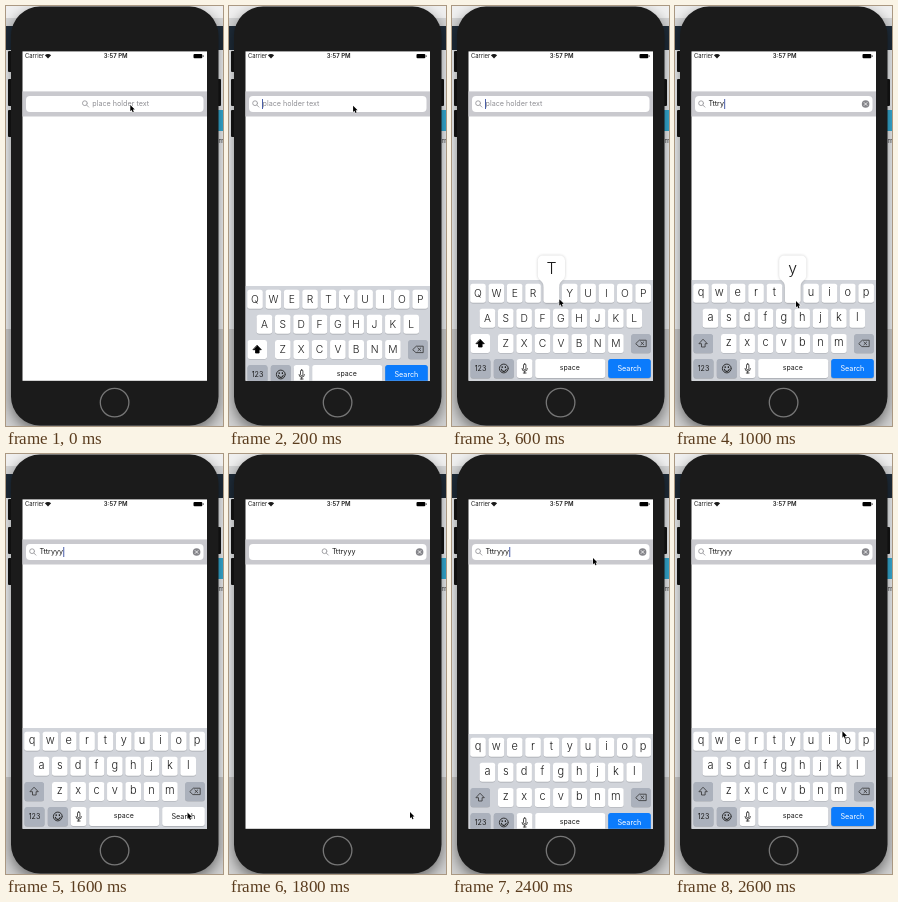
Animation, 217 px wide and 420 px high, one loop 2.7 s. Source, as an HTML page with a canvas:

```html
<!DOCTYPE html>
<html lang="en">
<head>
<meta charset="utf-8">
<title>Search bar typing</title>
<style>
html, body { margin: 0; width: 100%; height: 100%; overflow: hidden; background: #e8e8e8; }
canvas { display: block; width: 217px; height: 420px; }
</style>
</head>
<body>
<canvas id="stage"></canvas>
<script>
const W = 217, H = 420, LOOP = 2700, STEP = 100;
const FONT = 'Inter, "Liberation Sans", sans-serif';
const FIELD_SIZE = 7.2, PLACEHOLDER = 'place holder text';
const KEY_H = 19, KEY_W = 15.6, PITCH = 18.35;
const INK = '#1a1a1a', SPECIAL = '#abb1bc';
const ROWS = [['QWERTYUIOP', 26], ['ASDFGHJKL', 35.4], ['ZXCVBNM', 53.8]];
const SCREEN = [16.5, 45.4, 184.5, 329.4];
const rowY = i => 287.2 + 25.1 * i;

// Each track is a list of [time, value]; the value holds until the next one.
const TYPED = [[0, ''], [700, 'T'], [800, 'Tt'], [900, 'Ttt'], [1000, 'Tttry'], [1100, 'Tttryy'], [1200, 'Tttryyy']];
const PRESSED = [[0, ''], [600, 'T'], [700, ''], [800, 'T'], [900, 'R'], [1000, 'Y'], [1200, ''], [1300, 'Search'], [1700, '']];
const KEYBOARD_DROP = [[0, 105], [200, 6], [300, 0], [1700, 60], [1800, 105], [2400, 6], [2500, 0]];
const CARET = [[0, false], [200, true], [1700, false], [2400, true], [2600, false]];
const POINTER = [
  [0, 124.3, 99], [300, 124, 100], [500, 108, 270], [600, 107.3, 293.3], [800, 103, 292],
  [900, 86, 292], [1000, 121, 295], [1100, 120.5, 295], [1200, 150, 326], [1300, 180, 357],
  [1600, 181.5, 358.5], [1800, 181, 358], [1900, 170, 325], [2000, 151, 190],
  [2100, 140.7, 103.5], [2400, 141, 104], [2500, 156, 200], [2600, 167.4, 277.3]
];

const canvas = document.getElementById('stage');
const ratio = window.devicePixelRatio || 1;
canvas.width = W * ratio;
canvas.height = H * ratio;
const ctx = canvas.getContext('2d');
ctx.lineCap = ctx.lineJoin = 'round';

const hold = (track, t) => track.filter(k => k[0] <= t).pop()[1];

function pointerAt(t) {
  const next = POINTER.findIndex(p => p[0] > t);
  if (next < 0) return POINTER[POINTER.length - 1].slice(1);
  const a = POINTER[next - 1], b = POINTER[next], k = (t - a[0]) / (b[0] - a[0]);
  return [a[1] + (b[1] - a[1]) * k, a[2] + (b[2] - a[2]) * k];
}

function rect(x, y, w, h, color) {
  ctx.fillStyle = color;
  ctx.fillRect(x, y, w, h);
}

function round(x, y, w, h, r, color) {
  ctx.beginPath();
  ctx.roundRect(x, y, w, h, r);
  ctx.fillStyle = color;
  ctx.fill();
}

function text(s, x, y, size, color = INK, align = 'center', weight = 400) {
  ctx.font = `${weight} ${size}px ${FONT}`;
  ctx.textAlign = align;
  ctx.textBaseline = 'alphabetic';
  ctx.fillStyle = color;
  ctx.fillText(s, x, y);
}

function stroke(color, width, path) {
  ctx.beginPath();
  path();
  ctx.strokeStyle = color;
  ctx.lineWidth = width;
  ctx.stroke();
}

function polygon(points) {
  points.forEach(([x, y], i) => i ? ctx.lineTo(x, y) : ctx.moveTo(x, y));
  ctx.closePath();
}

function cross(x, y, r, color, width) {
  stroke(color, width, () => {
    ctx.moveTo(x - r, y - r); ctx.lineTo(x + r, y + r);
    ctx.moveTo(x + r, y - r); ctx.lineTo(x - r, y + r);
  });
}

function withShadow(alpha, blur, offsetY, paint) {
  ctx.save();
  ctx.shadowColor = `rgba(0,0,0,${alpha})`;
  ctx.shadowBlur = blur * ratio;
  ctx.shadowOffsetY = offsetY * ratio;
  paint();
  ctx.restore();
}

function drawBackdrop() {
  rect(0, 0, W, 12, '#f0f0f0');
  rect(0, 12, W, 8, '#d4d5d6');
  rect(0, 20, W, 24, '#1f2c39');
  rect(0, 44, W, 279, '#f4f6f8');
  rect(0, 323, W, 97, '#d2d2d2');
  rect(210, 104, 7, 21, '#37b2dc');
  text('m', 212.5, 137, 6, '#444', 'left');
}

function drawPhone() {
  [[45, 21], [73, 27], [104, 27]].forEach(([y, h]) => round(2, y, 5, h, 1, '#151515'));
  round(210, 73, 5, 27, 1, '#151515');
  withShadow(0.5, 14, 5, () => round(5, 0.5, 207.5, 419, 29, '#1b1b1b'));
  stroke('#777', 1.3, () => ctx.arc(108.6, 396.6, 14.3, 0, 7));
  rect(...SCREEN, '#fff');
}

function drawStatusBar() {
  text('Carrier', 19, 52.3, 5.9, INK, 'left');
  ctx.beginPath();
  ctx.moveTo(42, 52.4);
  ctx.arc(42, 52.4, 4.4, -2.36, -0.78);
  ctx.fillStyle = INK;
  ctx.fill();
  text('3:57 PM', 109.7, 52.3, 6, INK, 'center', 600);
  round(187.5, 48, 8.8, 4.2, 1, '#000');
  rect(196.8, 49.3, 0.7, 1.6, '#000');
}

function drawSearchBar(typed, editing, caret) {
  rect(16.5, 85.4, 184.5, 25.1, '#c9c9ce');
  round(20, 90, 177.5, 16, 4, '#fff');
  const label = typed || PLACEHOLDER;
  ctx.font = `400 ${FIELD_SIZE}px ${FONT}`;
  const width = ctx.measureText(label).width;
  const left = editing ? 33.5 : 114.7 - width / 2;
  const iconX = left - 7.6;
  stroke('#8e8e93', 0.8, () => {
    ctx.arc(iconX + 0.2, 97.2, 2.4, 0, 7);
    ctx.moveTo(iconX + 2, 99.1);
    ctx.lineTo(iconX + 4, 101.1);
  });
  text(label, left, 100, FIELD_SIZE, typed ? INK : '#8e8e93', 'left');
  if (caret) rect(left + (typed ? width + 0.2 : -0.5), 93, 1, 10, '#4a5fa8');
  if (typed) {
    ctx.beginPath();
    ctx.arc(190.6, 98, 3.8, 0, 7);
    ctx.fillStyle = '#85858a';
    ctx.fill();
    cross(190.6, 98, 1.4, '#fff', 0.8);
  }
}

function key(x, row, w, color = '#fff') {
  const y = rowY(row) - KEY_H / 2;
  round(x, y + 0.7, w, KEY_H, 2.5, '#a6a9af');
  round(x, y, w, KEY_H, 2.5, color);
}

function drawShift(upper) {
  key(18.5, 2, 19.5, upper ? '#fff' : SPECIAL);
  const y = rowY(2);
  ctx.beginPath();
  polygon([[28.3, y - 3.9], [32.3, y + 0.3], [30.1, y + 0.3], [30.1, y + 3.6], [26.5, y + 3.6], [26.5, y + 0.3], [24.3, y + 0.3]]);
  ctx.strokeStyle = ctx.fillStyle = upper ? '#000' : '#333';
  ctx.lineWidth = 0.8;
  if (upper) ctx.fill();
  ctx.stroke();
}

function drawDelete() {
  key(179.2, 2, 19.5, SPECIAL);
  const y = rowY(2);
  stroke('#333', 0.8, () => polygon([[184, y], [187.3, y - 3.2], [194.2, y - 3.2], [194.2, y + 3.2], [187.3, y + 3.2]]));
  cross(190.3, y, 1.4, '#333', 0.8);
}

function drawBottomRow(searching) {
  const y = rowY(3);
  key(18.5, 3, 20, SPECIAL);
  text('123', 28.5, y + 2.4, 7.1);
  key(41.8, 3, 20, SPECIAL);
  stroke('#222', 0.9, () => ctx.arc(51.8, y, 4.4, 0, 7));
  stroke('#222', 1.1, () => ctx.arc(51.8, y + 0.5, 2.4, 0.1, 3.04));
  rect(49.6, y - 2.2, 1.2, 1.7, '#222');
  rect(52.8, y - 2.2, 1.2, 1.7, '#222');
  key(64.8, 3, 15.6);
  stroke('#222', 0.8, () => ctx.roundRect(71.5, y - 4.6, 2.4, 5.8, 1.2));
  stroke('#222', 0.8, () => {
    ctx.arc(72.7, y, 2.7, 0, Math.PI);
    ctx.moveTo(72.7, y + 2.7); ctx.lineTo(72.7, y + 4.5);
    ctx.moveTo(71.3, y + 4.5); ctx.lineTo(74.1, y + 4.5);
  });
  key(83.2, 3, 70);
  text('space', 117.8, y + 1.8, 7);
  key(156.2, 3, 42.6, searching ? '#fff' : '#0b7bfc');
  text('Search', 177.4, y + 2.1, 7.2, searching ? INK : '#fff');
}

function drawPopup(x, letter) {
  const top = 249.5, bottom = rowY(0) + KEY_H / 2, half = KEY_W / 2;
  ctx.beginPath();
  ctx.moveTo(x, top);
  ctx.arcTo(x + 13.6, top, x + 13.6, top + 9, 5);
  ctx.lineTo(x + 13.6, 269);
  ctx.bezierCurveTo(x + 13.6, 275, x + half, 274, x + half, 281);
  ctx.arcTo(x + half, bottom, x, bottom, 2.5);
  ctx.arcTo(x - half, bottom, x - half, 281, 2.5);
  ctx.lineTo(x - half, 281);
  ctx.bezierCurveTo(x - half, 274, x - 13.6, 275, x - 13.6, 269);
  ctx.arcTo(x - 13.6, top, x, top, 5);
  ctx.closePath();
  ctx.fillStyle = '#fff';
  withShadow(0.2, 3, 0, () => ctx.fill());
  text(letter, x, 267.6, 15.8, INK, 'center', 300);
}

function drawKeyboard(drop, upper, pressed) {
  if (drop > 100) return;
  ctx.save();
  ctx.beginPath();
  ctx.rect(...SCREEN);
  ctx.clip();
  ctx.translate(0, drop);
  rect(16.5, 274, 184.5, 101, '#d1d4da');
  let popup = null;
  ROWS.forEach(([letters, start], row) => [...letters].forEach((name, i) => {
    const x = start + i * PITCH, letter = upper ? name : name.toLowerCase();
    key(x - KEY_W / 2, row, KEY_W);
    text(letter, x, rowY(row) + (upper ? 3.7 : 3), upper ? 10.3 : 11, INK, 'center', 300);
    if (name === pressed) popup = [x, letter];
  }));
  drawShift(upper);
  drawDelete();
  drawBottomRow(pressed === 'Search');
  if (popup) drawPopup(...popup);
  ctx.restore();
}

function drawPointer([x, y]) {
  ctx.save();
  ctx.translate(x, y);
  ctx.scale(0.92, 0.92);
  ctx.beginPath();
  polygon([[0, 0], [0, 6.9], [1.5, 5.5], [2.6, 8], [3.8, 7.5], [2.8, 5], [4.9, 4.9]]);
  ctx.strokeStyle = '#fff';
  ctx.lineWidth = 0.8;
  ctx.stroke();
  ctx.fillStyle = '#000';
  ctx.fill();
  ctx.restore();
}

function draw(now) {
  const t = Math.floor(now % LOOP / STEP) * STEP;
  const typed = hold(TYPED, t), drop = hold(KEYBOARD_DROP, t);
  const editing = drop < 60;
  ctx.setTransform(ratio, 0, 0, ratio, 0, 0);
  drawBackdrop();
  drawPhone();
  drawStatusBar();
  drawSearchBar(typed, editing, hold(CARET, t));
  drawKeyboard(drop, !typed, hold(PRESSED, t));
  drawPointer(pointerAt(t));
}

const began = performance.now();
function tick() {
  draw(performance.now() - began);
  requestAnimationFrame(tick);
}
tick();
</script>
</body>
</html>
```
